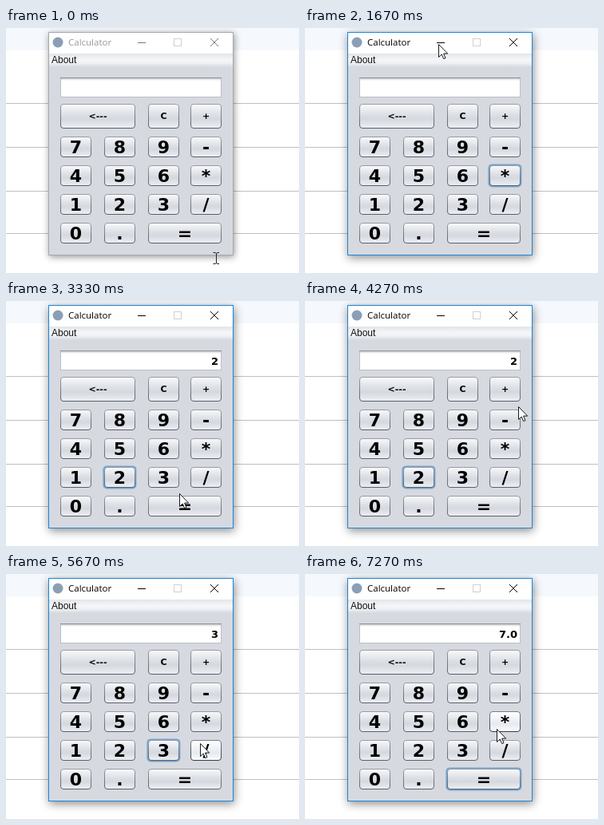
An HTML page that plays this animation: 367x307 px, repeating every 8000 ms.

```html
<!DOCTYPE html>
<html lang="en">
<head>
<meta charset="utf-8">
<title>Calculator</title>
<style>
  html, body { margin: 0; width: 100%; height: 100%; overflow: hidden; background: #fff; }
  svg { display: block; }
  .line { stroke: #c0c0c0; }
  .frame { fill: #d6d9df; stroke: #a6a8ab; filter: drop-shadow(1px 2px 4px rgba(0, 0, 0, .42)); }
  .caption { font: 11.5px "Open Sans", sans-serif; fill: #999; }
  .menu { font: 12px "Liberation Sans", sans-serif; fill: #111; }
  .icon { stroke: #777; fill: none; }
  .active .frame { stroke: #1c86d8; filter: drop-shadow(1px 3px 6px rgba(0, 0, 0, .46)); }
  .active .caption { fill: #000; }
  .active .icon { stroke: #000; }
  .display, .key text { font-family: "DejaVu Sans", sans-serif; font-weight: bold; fill: #000; }
  .display { font-size: 13px; text-anchor: end; }
  .key text { font-size: 22px; text-anchor: middle; }
  .key .small { font-size: 11px; }
  .ring { fill: #73a4d1; opacity: 0; }
  .focus .ring { opacity: 1; }
  .face { fill: url(#up); stroke: url(#edge); }
  .hot .face { fill: url(#hot); stroke: url(#edgeHot); }
  .down .face { fill: url(#down); stroke: url(#edgeDown); }
</style>
</head>
<body>
<svg width="367" height="307" viewBox="0 0 367 307">
  <defs>
    <linearGradient id="up" x2="0" y2="1">
      <stop offset="0" stop-color="#f8f9fb"/><stop offset=".45" stop-color="#dcdfe4"/>
      <stop offset=".62" stop-color="#d5d8de"/><stop offset="1" stop-color="#eceff4"/>
    </linearGradient>
    <linearGradient id="hot" x2="0" y2="1">
      <stop offset="0" stop-color="#fff"/><stop offset=".45" stop-color="#eef0f4"/>
      <stop offset=".62" stop-color="#e6e9ee"/><stop offset="1" stop-color="#fcfdff"/>
    </linearGradient>
    <linearGradient id="down" x2="0" y2="1">
      <stop offset="0" stop-color="#a2a9b6"/><stop offset=".5" stop-color="#a6adba"/>
      <stop offset="1" stop-color="#c3c9d3"/>
    </linearGradient>
    <linearGradient id="edge" x2="0" y2="1">
      <stop offset="0" stop-color="#989ca3"/><stop offset="1" stop-color="#5c6067"/>
    </linearGradient>
    <linearGradient id="edgeHot" x2="0" y2="1">
      <stop offset="0" stop-color="#767d89"/><stop offset="1" stop-color="#343d4b"/>
    </linearGradient>
    <linearGradient id="edgeDown" x2="0" y2="1">
      <stop offset="0" stop-color="#20262f"/><stop offset="1" stop-color="#4b5462"/>
    </linearGradient>
    <linearGradient id="bar" x2="0" y2="1">
      <stop offset="0" stop-color="#e2e5ea"/><stop offset=".45" stop-color="#f5f6f8"/>
      <stop offset=".7" stop-color="#eff1f4"/><stop offset="1" stop-color="#d6d9df"/>
    </linearGradient>
    <linearGradient id="inset" x2="0" y2="1">
      <stop offset="0" stop-color="#c9cbcf"/><stop offset="1" stop-color="#fff"/>
    </linearGradient>
  </defs>

  <rect width="367" height="307" fill="#fff"/>
  <rect width="367" height="28" fill="#f5f8fc"/>
  <path class="line" d="M0 94.5H367M0 149.5H367M0 204.5H367M0 257.5H367"/>

  <g id="win">
    <rect class="frame" x="53.5" y="5.5" width="231" height="279"/>
    <rect x="54" y="6" width="230" height="26" fill="#fff"/>
    <circle cx="65" cy="18" r="6.5" fill="#8a9fb5"/>
    <text class="caption" x="78" y="22">Calculator</text>
    <path class="icon" d="M165 18.5H175M256 13L266 23M266 13L256 23"/>
    <rect x="210.5" y="13.5" width="9" height="9" fill="none" stroke="#d0d0d0"/>
    <rect x="54" y="32" width="230" height="17" fill="url(#bar)"/>
    <text class="menu" x="57" y="44">About</text>
    <rect x="68.5" y="62.5" width="201" height="24" fill="#fff" stroke="#bcbfc5"/>
    <rect x="69" y="63" width="200" height="3" fill="url(#inset)"/>
    <path d="M68 62.5H270" stroke="#8d9096"/>
    <text class="display" id="display" x="266" y="80"></text>
    <g id="keys"></g>
  </g>

  <g id="beam" fill="none" stroke="#222">
    <path d="M-3.5 -6.5H-1L.5 -5.5L2 -6.5H4M.5 -6V7M-3.5 7.5H-1L.5 6.5L2 7.5H4"/>
  </g>
  <path id="arrow" d="M.5 .5V16.5L4.2 13L6.7 18.6L9 17.6L6.6 12.1H11.7Z" fill="#fff" stroke="#000" stroke-width=".9"/>
</svg>
<script>
  const LOOP = 8000;
  const byId = id => document.getElementById(id);

  const keys = [];
  function addKey(label, x, y, w, h) {
    const g = document.createElementNS("http://www.w3.org/2000/svg", "g");
    const small = h > 27;
    const base = y + h / 2 + (small ? 3.5 : 8);
    g.innerHTML =
      `<rect class="ring" x="${x - 1.6}" y="${y - 1.6}" width="${w + 3}" height="${h + 3}" rx="5"/>
       <rect class="face" x="${x + .5}" y="${y + .5}" width="${w - 1}" height="${h - 1}" rx="3.5"/>
       <text x="${x + w / 2}" y="${base}"${small ? ' class="small"' : ""}></text>`;
    g.lastElementChild.textContent = label;
    byId("keys").append(g);
    keys.push({ label, x, y, w, h, g });
  }

  const cols = [68, 123, 178, 231];
  addKey("<---", 68, 95, 94, 31);
  addKey("C", 178, 95, 39, 31);
  addKey("+", 231, 95, 39, 31);
  ["789-", "456*", "123/", "0."].forEach((row, r) =>
    [...row].forEach((label, c) => addKey(label, cols[c], 136 + 36 * r, 39, 26)));
  addKey("=", 178, 244, 92, 26);

  // Pointer route: time, x, y
  const route = [
    [0, 263, 288], [330, 172, 240], [530, 172, 240], [870, 154, 224],
    [1070, 138, 222], [1270, 138, 222], [1670, 167, 20], [1730, 167, 21],
    [2130, 132, 222], [2400, 132, 222], [3330, 217, 241], [3530, 240, 251],
    [3800, 272, 215], [4130, 275, 146], [4470, 255, 112], [4600, 254, 113],
    [4930, 201, 219], [5070, 201, 219], [5330, 261, 133], [5470, 261, 133],
    [5800, 232, 264], [5930, 232, 264], [6200, 230, 254], [6730, 230, 254],
    [7270, 240, 194], [LOOP, 240, 194]
  ];

  // Key presses: down, up, key, text shown on release
  const presses = [
    [2200, 2470, "2", "2"], [4530, 4600, "+", ""],
    [4930, 5070, "3", "3"], [6000, 6130, "=", "7.0"]
  ];
  const ACTIVATE = 1670;

  function pointerAt(t) {
    const i = route.findIndex(p => p[0] > t);
    const [t0, x0, y0] = route[i - 1], [t1, x1, y1] = route[i];
    const k = (t - t0) / (t1 - t0);
    return [Math.round(x0 + (x1 - x0) * k), Math.round(y0 + (y1 - y0) * k)];
  }

  function render(t) {
    const [x, y] = pointerAt(t);
    const active = t >= ACTIVATE;
    let focus = active ? "*" : "", held = "", shown = "";
    for (const [down, up, key, text] of presses) {
      if (t >= down) focus = key;
      if (t >= down && t < up) held = key;
      if (t >= up) shown = text;
    }
    byId("win").setAttribute("class", active ? "active" : "");
    byId("display").textContent = shown;
    for (const k of keys) {
      const over = x >= k.x && x < k.x + k.w && y >= k.y && y < k.y + k.h;
      const state = k.label === held ? " down" : over ? " hot" : "";
      k.g.setAttribute("class", "key" + state + (k.label === focus ? " focus" : ""));
    }
    const inside = y < 285;
    byId("arrow").style.display = inside ? "" : "none";
    byId("beam").style.display = inside ? "none" : "";
    byId(inside ? "arrow" : "beam").setAttribute("transform", `translate(${x} ${y})`);
  }

  // The screen refreshes 15 times a second
  function frame() {
    const tick = Math.floor((performance.now() % LOOP + 3.4) * 3 / 200) % 120;
    render(Math.round(tick * 20 / 3) * 10);
    requestAnimationFrame(frame);
  }
  frame();
</script>
</body>
</html>
```
